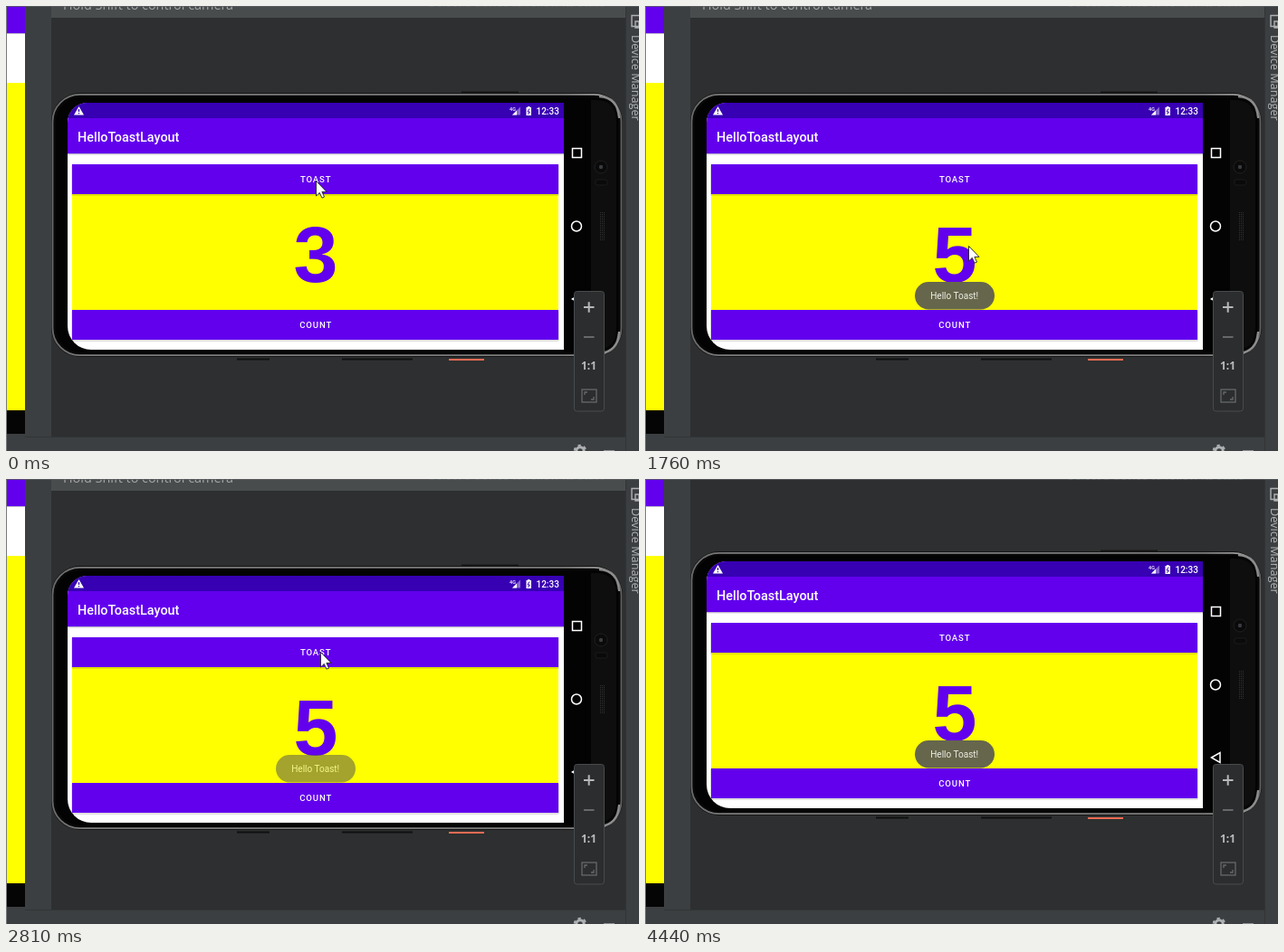
An HTML page that plays this animation: 699x492 px, repeating every 4.54 s.

```html
<!DOCTYPE html>
<html lang="en">
<head>
<meta charset="utf-8">
<title>HelloToastLayout</title>
<style>
  html, body { margin: 0; width: 100%; height: 100%; overflow: hidden; background: #3c3f41; }
  svg { display: block; }
  text { font-family: Roboto, sans-serif; fill: #fff; }
  .ide { font-family: "Open Sans", sans-serif; fill: #a4a6a8; }
  .label { font-size: 9.6px; font-weight: 500; letter-spacing: .86px; text-anchor: middle; }
  .purple { fill: #6200ee; }
  .line { fill: none; stroke: #fff; stroke-width: 1.5; }
  .dim { fill: none; stroke: #66696b; }
  #count { font: bold 88px "Liberation Sans", sans-serif; fill: #6200ee; text-anchor: middle; }
</style>
</head>
<body>
<svg width="699" height="492" viewBox="0 0 699 492">
  <defs>
    <linearGradient id="rim">
      <stop offset="0" stop-color="#6a6a6a"/>
      <stop offset=".06" stop-color="#7c7c7c"/>
      <stop offset=".9" stop-color="#7c7c7c"/>
      <stop offset=".97" stop-color="#a0a0a0"/>
      <stop offset="1" stop-color="#606060"/>
    </linearGradient>
    <pattern id="grill" width="2" height="2" patternUnits="userSpaceOnUse">
      <rect width="1" height="1" fill="#333"/>
    </pattern>
    <clipPath id="screen"><path d="M616 107V380H94A26 26 0 0 1 68 354V129A22 22 0 0 1 90 107Z"/></clipPath>
    <clipPath id="canvas"><rect x="50" width="634" height="476"/></clipPath>
  </defs>

  <!-- editor preview on the left -->
  <rect width="21" height="473" fill="#050505"/>
  <rect class="purple" width="21" height="30"/>
  <rect y="30" width="21" height="55" fill="#fff"/>
  <rect y="30" width="21" height="1" fill="#bdb8c8"/>
  <rect y="85" width="21" height="362" fill="#ff0"/>
  <rect width="1" height="492" fill="#77797a"/>

  <rect x="50" width="634" height="476" fill="#2d2f30"/>
  <g clip-path="url(#canvas)">
    <g id="scroll">
      <rect x="50" width="634" height="13" fill="#494c4d"/>
      <text class="ide" x="63" y="3.5" font-size="14.4">Hold Shift to control camera</text>

      <!-- phone body -->
      <path d="M503 95.5H566" stroke="#161616" stroke-width="2"/>
      <path d="M255 390.5H291M371 390.5H449" stroke="#101010" stroke-width="2"/>
      <path d="M489 391H528" stroke="#ec6c53" stroke-width="2"/>
      <rect x="50" y="96" width="631" height="292" rx="32" fill="#141414"/>
      <rect x="51.5" y="97.8" width="628" height="288.4" rx="30" fill="#080808" stroke="url(#rim)" stroke-width="1.8"/>
      <path d="M655 100Q676 101 677 124M655 384Q676 383 677 360" fill="none" stroke="#8c8c8c" stroke-width="2.5"/>
      <rect x="55" y="101" width="621" height="282" rx="27" fill="#030303"/>
      <path d="M646 104H652Q674 104 674 128V356Q674 380 652 380H646Z" fill="#0e0e0e"/>
      <circle cx="657" cy="178" r="7" fill="#0a0a0a" stroke="#202020"/>
      <circle cx="657" cy="178" r="2.2" fill="#3a3d40"/>
      <rect x="651" y="192" width="13" height="6" rx="2" fill="#0a0a0a" stroke="#1b1b1b"/>
      <rect x="656" y="228" width="5" height="31" fill="url(#grill)"/>
      <rect class="line" x="625.5" y="157.5" width="10" height="10"/>
      <circle class="line" cx="630" cy="243.5" r="5.5"/>
      <path class="line" d="M625.5 324L635 318.5V329.5Z"/>

      <!-- app screen -->
      <g clip-path="url(#screen)">
        <rect x="68" y="107" width="548" height="273" fill="#fff"/>
        <rect class="purple" x="68" y="107" width="548" height="56"/>
        <rect x="68" y="107" width="548" height="17" fill="#3700b3"/>
        <rect x="68" y="163" width="548" height="1" fill="#bcb6cc"/>
        <rect x="68" y="164" width="548" height="1" fill="#ebe9f0"/>
        <rect x="73" y="208" width="537" height="128" fill="#ff0"/>
        <path d="M80.5 111L86 120.5H75Z" fill="#fff"/>
        <path d="M80.5 114V117M80.5 118V119.2" stroke="#3700b3" stroke-width="1.2"/>
        <text x="556" y="115.5" font-size="5.5" font-weight="500">4G</text>
        <path d="M568 111.5V120.5H559Z" fill="#fff" opacity=".4"/>
        <path d="M564 115.5V120.5H559Z" fill="#fff"/>
        <path d="M576 111H578.5V112H580V121H574.5V112H576Z" fill="#fff"/>
        <path d="M578 113.5L576 117H578.5L576.5 119.8" fill="none" stroke="#3700b3"/>
        <text x="585.5" y="120" font-size="10" font-weight="500">12:33</text>
        <text x="79" y="149.5" font-size="14.4" font-weight="500">HelloToastLayout</text>
        <g id="buttons"></g>
        <text id="count" x="342" y="305">3</text>
        <g id="toast">
          <rect x="298" y="305" width="88" height="30.5" rx="15.25" fill="#66664c"/>
          <text x="341.7" y="324.3" font-size="10" text-anchor="middle" style="fill:#eeeee6">Hello Toast!</text>
        </g>
      </g>
    </g>
    <text class="ide" x="467" y="1" font-size="13" opacity=".7">Select a device to follow its state</text>
  </g>
  <rect width="699" height="1" fill="#5a5d5f" opacity=".8"/>

  <!-- zoom panel -->
  <rect x="627.5" y="315.5" width="33" height="132.500" rx="3" fill="#2b2d2e" stroke="#484b4d"/>
  <path d="M638 333H649.5M643.7 327.3V338.7" stroke="#b6b8b9" stroke-width="2"/>
  <path class="dim" d="M638 366H649.5" stroke-width="2"/>
  <text class="ide" x="643.5" y="402" font-size="12" font-weight="700" text-anchor="middle" style="fill:#b9bbbc">1:1</text>
  <rect class="dim" x="636" y="424" width="16" height="14" stroke-width="1.3"/>
  <path class="dim" d="M639 430V427H642M646 435H649V432" stroke-width="1.3"/>

  <!-- tool window edges -->
  <path d="M21 476.5H684" stroke="#323435"/>
  <path d="M684.5 1V492" stroke="#323435"/>
  <circle cx="634" cy="492" r="4.2" fill="none" stroke="#afb1b3" stroke-width="3"/>
  <circle cx="634" cy="492" r="6.3" fill="none" stroke="#afb1b3" stroke-width="2" stroke-dasharray="3.3"/>
  <path d="M660 491.5H672" stroke="#8c8e90"/>
  <path d="M699 10.5H691V22.5H699M695 17H699V24H695Z" fill="none" stroke="#afb1b3" stroke-width="1.4"/>
  <text class="ide" transform="translate(690.5 32) rotate(90)" font-size="12.7" style="fill:#b4b6b8">Device Manager</text>

  <path id="cursor" d="M.5 .5V17L4.3 13.4 6.9 19.2 9.5 18.1 6.900 12.4H12Z" fill="#fff" stroke="#222" stroke-width=".9"/>
</svg>
<script>
const LOOP = 4540;
const $ = id => document.getElementById(id);

// Each track holds [time, ...values]; values stay until the next entry.
const cursorTrack = [
  [0, 342, 193], [390, 345, 212], [540, 357, 268], [690, 374, 296], [840, 378, 317],
  [990, 380, 331], [1110, 382, 343], [1760, 357, 265], [1880, 351, 228], [2000, 348, 201],
  [2120, 347, 195], [2240, 347, 191], [3220, 365, 202], [3340, 529, 341], [3490, 430, 402],
  [3610, 330, 421], [3730, 261, 423], [3880, 249, 414], [4030, -50, -50]
];
const toastTrack = [[0, 0], [390, .25], [540, .7], [690, 1], [2390, .8], [2540, .42], [2660, 0], [2810, .6], [2940, 1]];
const toastPress = [[0, 0], [140, .6], [260, 1], [390, 0], [2390, 1], [2540, 0]];
const countPress = [[0, 0], [1510, 1], [1760, 0]];
const countTrack = [[0, 3], [1510, 4], [1630, 5]];

const at = (track, t) => track.findLast(key => key[0] <= t).slice(1);

function addButton(label, y) {
  $('buttons').insertAdjacentHTML('beforeend', `
    <rect id="${label}Shadow" x="72" y="${y}" width="539" height="35" rx="2"/>
    <rect class="purple" x="73" y="${y}" width="537" height="33"/>
    <rect id="${label}Ripple" x="73" y="${y}" width="537" height="33" fill="#fff"/>
    <text class="label" x="342.2" y="${y + 20}">${label}</text>`);
}

function press(label, amount) {
  $(label + 'Shadow').setAttribute('opacity', .12 + amount * .15);
  $(label + 'Ripple').setAttribute('opacity', amount * .2);
}

function draw() {
  const t = (performance.now() - start) % LOOP;
  $('cursor').setAttribute('transform', `translate(${at(cursorTrack, t)})`);
  $('toast').setAttribute('opacity', at(toastTrack, t)[0]);
  $('count').textContent = at(countTrack, t)[0];
  $('scroll').setAttribute('transform', `translate(0 ${t < 4440 ? 0 : -16})`);
  press('TOAST', at(toastPress, t)[0]);
  press('COUNT', at(countPress, t)[0]);
  requestAnimationFrame(draw);
}

addButton('TOAST', 175);
addButton('COUNT', 336);
const start = performance.now();
draw();
</script>
</body>
</html>
```
